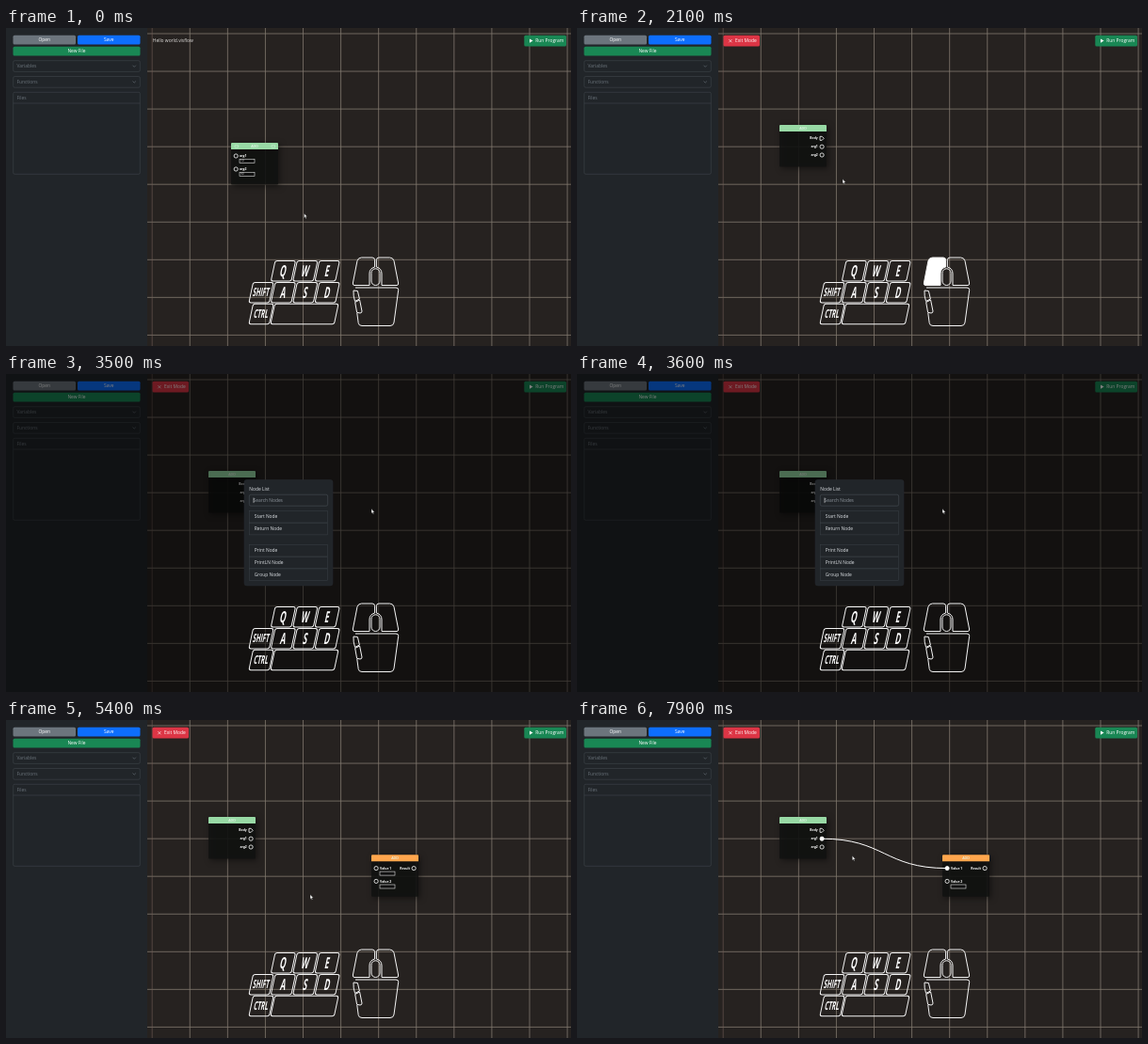
Animation, 600 px wide and 338 px high, one loop 8 s. Source, as an HTML page:

```html
<!DOCTYPE html>
<html lang="en">
<head>
<meta charset="utf-8">
<title>Visual flow editor</title>
<style>
  html, body { margin: 0; width: 100%; height: 100%; overflow: hidden; background: #262220; }
  svg { display: block; width: 600px; height: 338px; font-family: "Open Sans", "Noto Sans", sans-serif; }
  text { dominant-baseline: central; white-space: pre; }
  .node { filter: drop-shadow(2px 2px 3px rgba(0, 0, 0, .5)); }
  .overlay { fill: none; stroke: #f4f4f4; stroke-width: 1; stroke-linejoin: round; }
  .overlay text { stroke: none; font-family: "Open Sans", "Liberation Sans", sans-serif; font-weight: 700; }
</style>
</head>
<body>
<svg viewBox="0 0 600 338"><g id="base"></g><g id="view"></g></svg>
<script>
const LOOP = 8000;
const clamp = v => Math.max(0, Math.min(1, v));
const ramp = (t, from, to) => clamp((t - from) / (to - from));
const smooth = p => p * p * (3 - 2 * p);
const within = (t, ...spans) => spans.some(([a, b]) => t >= a && t < b);

const rect = (x, y, w, h, fill, stroke = 'none', rx = 0, width = .5) =>
  `<rect x="${x}" y="${y}" width="${w}" height="${h}" rx="${rx}" fill="${fill}" stroke="${stroke}" stroke-width="${width}"/>`;
const label = (x, y, s, size = 4.9, fill = '#fff', anchor = 'start', weight = 400) =>
  `<text x="${x}" y="${y - size * .1}" font-size="${size}" fill="${fill}" text-anchor="${anchor}" font-weight="${weight}">${s}</text>`;
const line = (d, stroke, width = .6, fill = 'none') =>
  `<path d="${d}" stroke="${stroke}" stroke-width="${width}" fill="${fill}"/>`;
const button = (x, y, w, h, fill, s) =>
  rect(x, y, w, h, fill, 'none', 1.5) + label(x + w / 2, y + h / 2, s, 4.9, '#fff', 'middle');

function grid() {
  let d = '';
  for (let i = 1; i < 12; i++) d += `M${155.2 + i * 40.08} 0V338`;
  for (let i = 0; i < 9; i++) d += `M150 ${6 + i * 40.05}H600`;
  return line(d, '#82796f', .8) + line('M155.2 0V338', '#75605a', .6);
}

function sidebar() {
  const border = '#454b51', dim = '#6c757d';
  const select = (y, s) => rect(7.7, y, 134.6, 11.7, 'none', border, 1.5) +
    label(11.5, y + 5.9, s, 4.9, dim) + line(`M134.5 ${y + 5}l1.7 1.7l1.7 -1.7`, dim);
  return rect(0, 0, 150, 338, '#212529') +
    button(7.5, 7.8, 66.5, 9.8, '#6c757d', 'Open') +
    button(76, 7.8, 66.5, 9.8, '#0d6efd', 'Save') +
    button(7.5, 19.7, 135, 9.8, '#198754', 'New File') +
    select(34.7, 'Variables') + select(51.5, 'Functions') +
    rect(7.7, 68.3, 134.6, 87, 'none', border, 1.5) +
    line('M7.7 80H142.3', border, .5) + label(11.5, 74.2, 'Files', 4.9, dim);
}

const port = (x, y, on) =>
  `<circle cx="${x}" cy="${y}" r="2.1" fill="${on ? '#fff' : 'none'}" stroke="#fff" stroke-width=".8"/>`;
const portName = (x, y, s, anchor) => label(x, y, s, 3.4, '#fff', anchor, 700);
const field = (x, y, s = '') => rect(x, y, 16, 4, '#111', '#ddd', 0, .6) + label(x + 1, y + 2, s, 3, '#ddd');

function node(x, y, color, title, hover, content) {
  return `<g transform="translate(${x} ${y})"><g class="node">` +
    rect(0, 0, 50, 44.5, 'rgba(17,18,17,.85)', 'none', 1) +
    `<path d="M0 7V1Q0 0 1 0H49Q50 0 50 1V7Z" fill="${color}"/></g>` +
    label(25, 3.8, title, 3.6, '#e9f7ec', 'middle', 600) + content +
    (hover ? rect(-.8, -.8, 51.6, 46, 'none', '#fff', 1.5, 1) : '') + '</g>';
}

function callNode(hover) {
  const icons = line('M4 2.5h3.5v2.5h-3.5zM43 2.5h3.5v2.5h-3.5z', '#c9ecd0', .6);
  return node(239, 122, '#98d9a5', 'ADD', hover, icons +
    [['arg1', '10'], ['arg2', '90']].map(([name, value], i) => {
      const y = 14 + 14 * i;
      return port(5.2, y, false) + portName(9, y, name) + field(9, y + 3.6, value);
    }).join(''));
}

function startNode(hover, wired) {
  return node(215, 103, '#98d9a5', 'ADD', hover,
    line('M43 12.3h2.2l2 2l-2 2h-2.2z', '#fff', .8) + portName(40.8, 14.3, 'Body', 'end') +
    port(45.1, 23.2, wired) + portName(40.8, 23.2, 'arg1', 'end') +
    port(45.1, 32, false) + portName(40.8, 32, 'arg2', 'end'));
}

function addNode(hover, wired) {
  return node(388, 143.3, '#ffa64d', 'ADD', hover,
    port(5.1, 14.3, wired) + portName(9, 14.3, 'Value 1') + (wired ? '' : field(9, 17.8)) +
    port(5.1, 28.1, false) + portName(9, 28.1, 'Value 2') + field(9, 31.7) +
    port(45.1, 14.3, false) + portName(41, 14.3, 'Result', 'end'));
}

function wire(x, y) {
  const mid = (260 + x) / 2;
  return line(`M260 126.2C${mid} 126.2 ${mid} ${y} ${x} ${y}`, '#fff', 1);
}

function modal(t) {
  const typed = 'add'.slice(0, [4280, 4420, 4580].filter(k => t >= k).length);
  const short = typed.length > 1;
  const focus = ramp(t, 3600, 3750);
  const hover = t >= 4450;
  const top = short ? 143.4 : 112.5;
  const item = (y, s, lit) => rect(258.3, y, 83.4, 12.8, lit ? '#282c31' : 'none', '#3b4147', lit ? 1.5 : 0) +
    label(263.8, y + 6.5, s, 4.9, lit ? '#fff' : '#dee2e6', 'start', lit ? 600 : 400);
  const caret = 263 + [0, 2.6, 5.6, 8.6][typed.length];
  const list = short ? item(top + 32.6, 'Add Node', hover) :
    ['Start Node', 'Return Node'].map((s, i) => item(top + 32.8 + 12.8 * i, s)).join('') +
    ['Print Node', 'PrintLN Node', 'Group Node'].map((s, i) => item(top + 68.8 + 12.8 * i, s)).join('');
  return rect(253, top, 94, short ? 50.4 : 112.4, '#212529', '#272b30', 2.5) +
    label(258.3, top + 9.6, 'Node List', 4.9, '#dee2e6') +
    (focus ? rect(258, top + 15.4, 84, 12.6, 'none', `rgba(13,110,253,${.3 * focus})`, 2, 1.2) : '') +
    rect(258.3, top + 15.7, 83.4, 12, '#212529', focus > .5 ? '#3d86e8' : '#495057', 1.8, .6) +
    label(262.6, top + 21.8, typed || 'Search Nodes', 4.9, typed ? '#dee2e6' : '#8f969d') +
    (t >= 3500 ? line(`M${caret} ${top + 19}v5.6`, '#fff', .5) : '') + list;
}

function keyboard(t) {
  const pressed = { A: [4280, 4380], D: [4420, 4500], D2: [4580, 4660] };
  const key = (cx, cy, s = '', w = 21.6) => {
    const on = [s, s + '2'].some(k => pressed[k] && within(t, pressed[k]));
    const size = s.length > 1 ? 12.5 : 16.5;
    return `<g transform="translate(${cx} ${cy}) skewX(-12)">` +
      `<rect x="${-w / 2}" y="-10.7" width="${w}" height="21.4" rx="2.2"${on ? ' fill="#fff"' : ''}/>` +
      `<text transform="scale(.5 1)" y="-.8" font-size="${size}" text-anchor="middle" fill="${on ? '#222' : '#fff'}">${s}</text></g>`;
  };
  const row = (y, s) => [...s].map((c, i) => key(294.4 + 23.4 * i, y, c)).join('');
  return row(258.3, 'QWE') + row(281.2, 'ASD') +
    key(271, 281.2, 'SHIFT') + key(271, 304, 'CTRL') + key(317, 304, '', 67.5);
}

function mouse(t) {
  const side = 'M377.5 244H389Q391.6 244 391.6 246.5V254Q386 255.5 386 261V273.5H370Q368 273.5 368.4 271L373 247.5Q374 244 377.5 244Z';
  const fill = on => on ? '#fff' : 'none';
  const left = within(t, [1850, 1930], [2010, 2120], [5130, 5240], [6780, 7560]);
  const right = within(t, [3150, 3260]);
  return `<path d="${side}" fill="${fill(left)}"/>` +
    `<path d="${side}" transform="matrix(-1 0 0 1 785 0)" fill="${fill(right)}"/>` +
    '<rect x="388" y="255.8" width="9" height="17.7" rx="4.5"/>' +
    '<path d="M371 276H414Q417 276 416.7 278.5L412 313Q411.5 316.5 408 316.5H378Q374.6 316.5 374.2 313.5L372.8 303"/>' +
    '<path d="M369 279L373.4 279.5L375.4 288L370.6 290.5Q368.6 285 369 279ZM370.7 291.5L375.6 289L378 301Q378 303 376 303L372.6 302.3Z"/>';
}

// Cursor stops: time, x, y
const stops = [
  [0, 316.5, 197], [250, 316.5, 197], [400, 312.5, 191.5], [550, 312.5, 191.5], [1000, 318, 186.5],
  [1250, 318, 186.5], [1650, 282, 158.8], [2050, 282, 158.8], [2100, 282, 160.5], [2600, 282, 160.5],
  [3050, 388, 143.3], [3700, 388, 143.3], [4200, 328.5, 183.6], [5150, 328.5, 183.6],
  [5400, 323, 185.5], [5950, 290, 148], [6550, 260, 126], [6800, 260, 126],
  [7350, 393, 157.5], [7560, 393, 157.5], [7900, 292.3, 144.3], [8000, 292.3, 144.3]
];

function pointer(t) {
  const i = stops.findIndex(s => s[0] > t);
  const [a, ax, ay] = stops[i - 1], [b, bx, by] = stops[i];
  const p = smooth(ramp(t, a, b));
  return [ax + (bx - ax) * p, ay + (by - ay) * p];
}

function cursor([x, y], hand) {
  const shape = hand
    ? 'M-.6 .2Q0 -.5 .6 .2V2.2L2.8 2.8Q3.4 3 3.2 4L2.6 6.3H-.6L-2.3 3.8Q-2 3 -.6 3.9Z'
    : 'M0 0V4.9L1.1 3.9L1.9 5.7L2.7 5.3L1.9 3.6H3.4Z';
  return `<g transform="translate(${x} ${y})">${line(shape, '#111', .4, '#fff')}</g>`;
}

function draw(t) {
  const at = pointer(t);
  const over = (x, y) => at[0] > x && at[0] < x + 50 && at[1] > y && at[1] < y + 45;
  const editing = t >= 2080, placed = t >= 5200, dragging = t >= 6800, wired = t >= 7400;
  const open = t < 5180 ? ramp(t, 3220, 3500) : 1 - ramp(t, 5180, 5370);
  const overCall = !editing && over(239, 122);
  const overStart = editing && !open && over(215, 103);
  const overAdd = placed && !open && over(388, 143.3);

  let s = editing
    ? rect(155.5, 7.7, 38.5, 11.8, '#dc3545', 'none', 1.5) +
      line('M161.3 12.1l3.2 3.2m0 -3.2l-3.2 3.2', '#fff', .6) + label(168, 13.8, 'Exit Mode')
    : label(155.8, 13.8, 'Hello world.visflow', 4.9, '#e4e2e0');
  s += rect(550.3, 7.7, 44.7, 11.8, '#198754', 'none', 1.5) +
    '<path d="M556 11.4L559.6 13.6L556 15.8Z" fill="#fff"/>' + label(562.3, 13.8, 'Run Program');
  s += editing ? startNode(overStart, dragging) : callNode(overCall);
  if (placed) s += addNode(overAdd, wired);
  if (dragging) s += wired ? wire(393, 157.6) : wire(...at);
  if (open > 0) {
    s += rect(0, 0, 600, 338, `rgba(0,0,0,${.5 * open})`) +
      `<g opacity="${open}" transform="translate(0 ${-15 * (1 - open) ** 2})">${modal(t)}</g>`;
  }
  s += `<g class="overlay">${keyboard(t)}${mouse(t)}</g>`;
  s += cursor(at, overCall || within(t, [4150, 5180]));
  document.getElementById('view').innerHTML = s;
}

document.getElementById('base').innerHTML = rect(0, 0, 600, 338, '#262220') + grid() + sidebar();

function tick() {
  draw(performance.now() % LOOP);
  requestAnimationFrame(tick);
}
tick();
</script>
</body>
</html>
```
